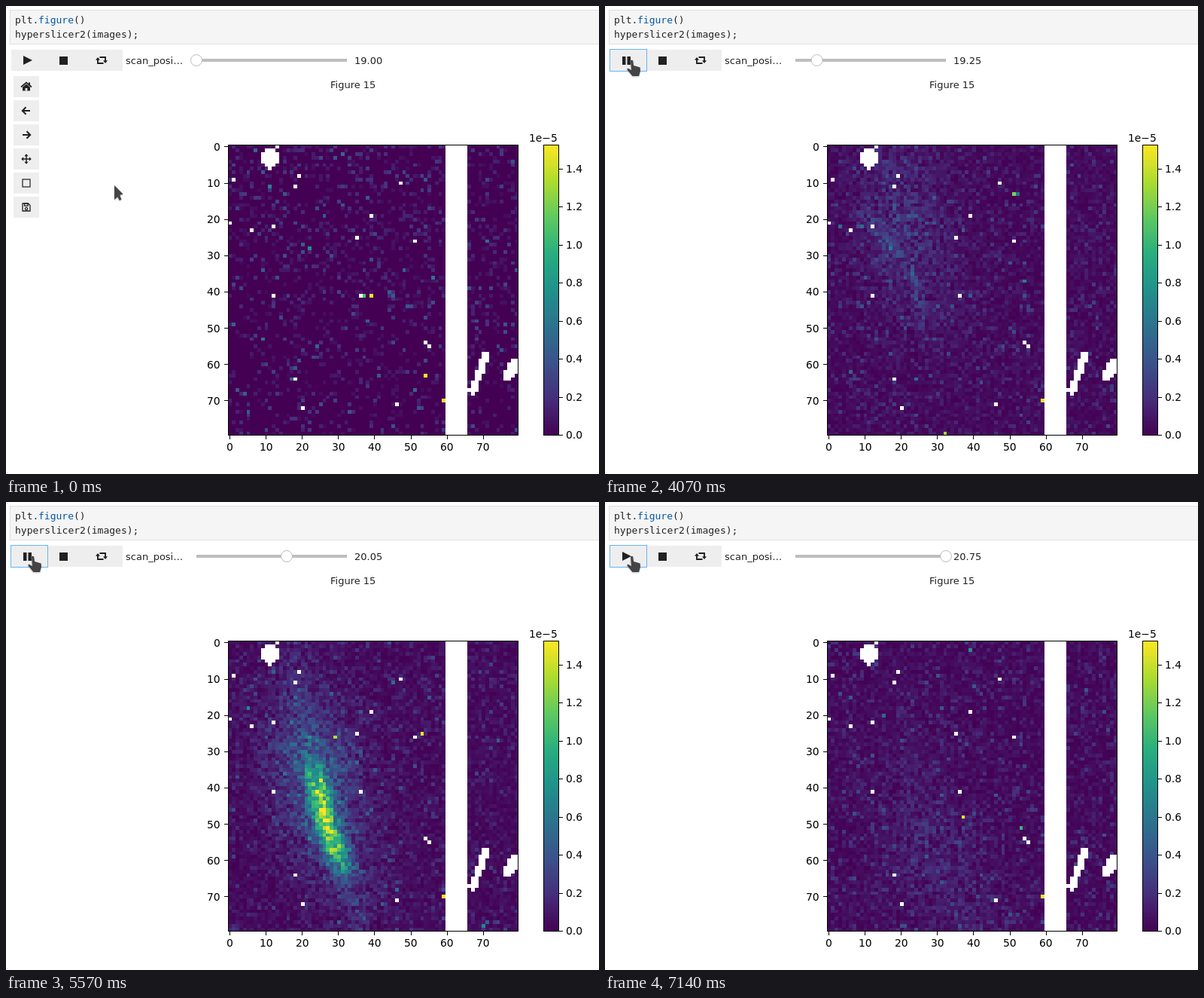
An HTML page with a canvas that plays this animation: 788 by 621 pixels, repeating every 8000 ms.

```html
<!DOCTYPE html>
<html lang="en">
<head>
<meta charset="utf-8">
<title>Image slicer</title>
<style>
html, body { margin: 0; width: 100%; height: 100%; overflow: hidden; background: #fff; }
canvas { display: block; }
</style>
</head>
<body>
<canvas id="stage" width="788" height="621"></canvas>
<script>
const ctx = document.getElementById('stage').getContext('2d');
const LOOP = 8000, STEP = 71.4, SLICE = 96, LAST = 35;
const HOVER = 1710, ENTER = 2070, PRESS = 3360, PLAY = 3570, END = 7140;
const N = 80, VMAX = 1.527;
const AX = { x: 295.5, y: 184.5, size: 385 };
const INK = '#212121', GREY = '#bdbdbd', PALE = '#eee';
const SANS = '"DejaVu Sans", sans-serif';
const MONO = '"DejaVu Sans Mono", monospace';

const clamp = (v, lo, hi) => Math.min(hi, Math.max(lo, v));
const mix = (a, b, p) => a + (b - a) * p;
const bell = v => Math.exp(-v * v);

// Colour map
const STOPS = ['440154', '472d7b', '3b528b', '2c728e', '21918c', '28ae80', '5ec962', 'addc30', 'fde725']
  .map(h => [0, 2, 4].map(i => parseInt(h.slice(i, i + 2), 16)));

function viridis(p) {
  const q = clamp(p, 0, 1) * (STOPS.length - 1);
  const i = Math.min(Math.floor(q), STOPS.length - 2);
  return STOPS[i].map((c, k) => Math.round(mix(c, STOPS[i + 1][k], q - i)));
}

function random(seed) {
  let a = seed * 7919 + 17;
  return () => {
    a = (a + 0x6D2B79F5) | 0;
    let t = Math.imul(a ^ (a >>> 15), 1 | a);
    t = (t + Math.imul(t ^ (t >>> 7), 61 | t)) ^ t;
    return ((t ^ (t >>> 14)) >>> 0) / 4294967296;
  };
}

// Distance from a point to a segment
function distance(x, y, x1, y1, x2, y2) {
  const dx = x2 - x1, dy = y2 - y1;
  const p = clamp(((x - x1) * dx + (y - y1) * dy) / (dx * dx + dy * dy), 0, 1);
  return Math.hypot(x - x1 - p * dx, y - y1 - p * dy);
}

// Brightness of the plume: it swells until slice 15, then thins and sinks
function plume(x, y, s) {
  const d = x - (18.5 + .05 * y + .0023 * y * y);
  const burst = bell((s - 15) / 5.5);
  const width = clamp((s - 3) / 3.3, 1, 3.3);
  const reach = (y - 40 - .42 * s) / (10 + 14 * burst);
  const body = 3 * burst * bell(d / width) * bell(reach * reach);
  const thread = .7 * burst * burst * bell(d / 2.8);
  const core = 1.3 * burst ** 2 * bell(Math.hypot(x - 24, y - 31) / 8);
  const jet = bell((s - 9) / 3) * bell(distance(x, y, 10, 17, 18, 29) / 1.6);
  const haze = .45 * clamp(s / 8, 0, 1) * Math.exp(-Math.abs(s - 15) / 12)
    * bell(d / 12) * bell((y - 15 - 1.25 * s) / 26);
  return body + thread + core + jet + haze;
}

// Cells without data: a gap, three blots and scattered dots
function blank(x, y) {
  return (x >= 60 && x < 66)
    || Math.hypot((x - 11) / 2.3, (y - 3.2) / 2.9) < 1
    || distance(x, y, 70.7, 57.5, 66.9, 67.2) < 1.05
    || distance(x, y, 78.6, 60.3, 76.5, 62.8) < 1.5;
}

function scatter(rnd, count, draw) {
  for (let i = 0; i < count; i++) draw(Math.floor(rnd() * 58), Math.floor(rnd() * N));
}

const map = document.createElement('canvas');
map.width = map.height = N;
const mapCtx = map.getContext('2d');
const pixels = mapCtx.createImageData(N, N);
const WHITE = [255, 255, 255];
let shown = -1;

function setCell(x, y, rgb) {
  pixels.data.set([...rgb, 255], (y * N + x) * 4);
}

function renderMap(slice) {
  if (slice === shown) return;
  shown = slice;
  const rnd = random(slice + 3);
  const dense = Math.min(1, slice / 5);
  for (let y = 0; y < N; y++) {
    for (let x = 0; x < N; x++) {
      const spread = -Math.log(1 - rnd());
      const sparse = rnd() < .28 - .0015 * y ? .04 + .09 * spread : 0;
      const glow = dense * plume(x, y, slice);
      const v = mix(sparse, .06 * spread, dense) + glow + (rnd() - .5) * .7 * Math.sqrt(glow);
      setCell(x, y, blank(x, y) ? WHITE : viridis(v / VMAX));
    }
  }
  scatter(rnd, 3, (x, y) => setCell(x, y, viridis(.4 + .6 * rnd())));
  setCell(59, 70, viridis(.97));
  scatter(random(5), 18, (x, y) => setCell(x, y, WHITE));
  mapCtx.putImageData(pixels, 0, 0);
}

// Drawing helpers; text starts on a whole pixel
function text(s, x, y, { size = 13, color = INK, align = 0, family = SANS } = {}) {
  ctx.font = `${size}px ${family}`;
  ctx.fillStyle = color;
  ctx.fillText(s, Math.round(x - align * ctx.measureText(s).width), Math.round(y));
}

function rect(x, y, w, h, color) {
  ctx.fillStyle = color;
  ctx.fillRect(x, y, w, h);
}

function frame(x, y, w, h, color, width = 1) {
  ctx.strokeStyle = color;
  ctx.lineWidth = width;
  ctx.strokeRect(x, y, w, h);
}

function poly(points, color) {
  ctx.beginPath();
  points.forEach(([x, y]) => ctx.lineTo(x, y));
  ctx.closePath();
  ctx.fillStyle = color;
  ctx.fill();
}

function line(points, width) {
  ctx.beginPath();
  points.forEach(([x, y]) => ctx.lineTo(x, y));
  ctx.lineWidth = width;
  ctx.strokeStyle = INK;
  ctx.stroke();
}

function circle(x, y, r, width, color, fill) {
  ctx.beginPath();
  ctx.arc(x, y, r, 0, 7);
  if (fill) {
    ctx.fillStyle = fill;
    ctx.fill();
  }
  ctx.lineWidth = width;
  ctx.strokeStyle = color;
  ctx.stroke();
}

function at(x, y, angle, draw) {
  ctx.save();
  ctx.translate(x, y);
  ctx.rotate(angle);
  draw();
  ctx.restore();
}

function shadow(blur) {
  ctx.shadowColor = 'rgba(0,0,0,.3)';
  ctx.shadowBlur = blur;
  ctx.shadowOffsetY = 1;
}

function drawCode() {
  rect(5, 5, 800, 46, '#e0e0e0');
  rect(6, 6, 800, 44, '#f5f5f5');
  text('plt.', 12, 23, { family: MONO });
  text('figure', 43.3, 23, { family: MONO, color: '#0055aa' });
  text('()', 90.3, 23, { family: MONO });
  text('hyperslicer2(images);', 12, 42, { family: MONO });
}

function button(x, w, fill, hover) {
  ctx.save();
  if (hover) shadow(4);
  rect(x, 58, w, 28, fill);
  ctx.restore();
}

function repeatArm() {
  line([[-5, -1], [-5, 4], [2.5, 4]], 1.9);
  poly([[-8, -.3], [-5, -4], [-2, -.3]], INK);
}

function drawPlayer(t) {
  const pressed = t >= PRESS;
  const shade = pressed ? Math.round(mix(189, 238, clamp((t - PLAY) / 360, 0, 1))) : 238;
  button(101, 54, PALE);
  button(55, 46, PALE, t >= HOVER && t < ENTER);
  button(7, 48, `rgb(${shade},${shade},${shade})`, t >= ENTER && !pressed);
  if (pressed) frame(6.5, 57.5, 49, 29, '#64b5f6');
  if (t >= PLAY && t < END) {
    rect(23, 67, 4.5, 11, INK);
    rect(29.5, 67, 4.5, 11, INK);
  } else {
    poly([[23, 66], [35, 72], [23, 78]], INK);
  }
  rect(71, 67, 11, 11, INK);
  at(127, 72, 0, repeatArm);
  at(127, 72, Math.PI, repeatArm);
}

function drawSlider(handle, value) {
  text('scan_posi…', 159, 77);
  rect(253, 70, 200, 4, GREY);
  circle(253 + 200 * handle / LAST, 72, 7.5, 1, GREY, '#fff');
  text((19 + value * .05).toFixed(2), 463, 77);
}

function home() {
  line([[-7, .5], [0, -5.5], [7, .5]], 1.7);
  rect(3, -5.5, 2, 4, INK);
  poly([[-5, .8], [0, -3.4], [5, .8], [5, 5.5], [-5, 5.5]], INK);
  rect(-1.4, 2, 2.8, 3.5, PALE);
}

function arrow() {
  line([[-5, 0], [5, 0]], 2);
  line([[.5, -4.7], [5.2, 0], [.5, 4.7]], 2);
}

function move() {
  for (let i = 0; i < 4; i++) at(0, 0, i * Math.PI / 2, () => {
    line([[0, 0], [5, 0]], 1.5);
    poly([[3.8, -2.7], [6.8, 0], [3.8, 2.7]], INK);
  });
}

function save() {
  line([[-5, -5], [2.5, -5], [5, -2.5], [5, 5], [-5, 5], [-5, -5.5]], 1.3);
  frame(-2.5, -5, 4.5, 3.2, INK, 1.3);
  circle(0, 2, 1.6, 1.3, INK);
}

const ICONS = [home, () => at(0, 0, Math.PI, arrow), arrow, move, () => frame(-5, -5, 10, 10, INK, 1.2), save];

function drawToolbar(t) {
  const alpha = t < HOVER ? 1 : t < ENTER ? .7 : t < 2210 ? .2 : 0;
  if (!alpha) return;
  ctx.globalAlpha = alpha;
  ICONS.forEach((icon, i) => {
    rect(10, 93 + 32 * i, 34, 28, PALE);
    at(27, 107 + 32 * i, 0, icon);
  });
  ctx.globalAlpha = 1;
}

function drawPlot(slice) {
  renderMap(slice);
  const { x, y, size: side } = AX;
  const label = (s, lx, ly, align = 0) => text(s, lx, ly, { size: 13.89, color: '#000', align });
  text('Figure 15', 461, 109, { align: .5 });
  ctx.imageSmoothingEnabled = false;
  ctx.drawImage(map, x, y, side, side);
  for (let i = 0; i < side; i++) rect(714.5, y + i, 20, 1.5, `rgb(${viridis(1 - i / side)})`);
  frame(x, y, side, side, '#000');
  frame(714.5, y, 20, side, '#000');
  for (let n = 0; n < N; n += 10) {
    const d = (n + .5) * side / N;
    rect(Math.floor(x + d - .5), 570, 1, 5, '#000');
    rect(290, Math.floor(y + d), 5, 1, '#000');
    label(n, x + d - .6, 590, .5);
    label(n, 285, y + d + 5, 1);
  }
  for (let v = 0; v < 1.5; v += .2) {
    const py = y + side * (1 - v / VMAX);
    rect(735, Math.floor(py), 5, 1, '#000');
    label(v.toFixed(1), 744, Math.floor(py) + 5);
  }
  label('1e−5', 733, 180, 1);
}

const POINTER = [[0, 0], [0, 19], [4.2, 15.2], [6.8, 20], [9.4, 18.7], [7.2, 13], [11.5, 11.5]];
const HAND = [[4.5, 0], [7.5, 0], [8.5, 7], [17, 9.5], [17.5, 14], [15.5, 21], [7, 21], [0, 12.5], [.5, 10.5], [5.5, 13]];

function cursor(shape, x, y) {
  at(x, y, 0, () => {
    ctx.save();
    shadow(2);
    poly(shape, '#444');
    ctx.restore();
    ctx.lineJoin = 'round';
    ctx.lineWidth = 1;
    ctx.strokeStyle = 'rgba(255,255,255,.6)';
    ctx.stroke();
    poly(shape, '#444');
  });
}

function drawCursor(t) {
  if (t >= ENTER) return cursor(HAND, 29.5, 72);
  if (t >= HOVER) return cursor(HAND, 58, 76);
  const p = clamp(Math.floor((t - 860) / STEP) + 1, 0, 12) / 12;
  const e = p * p * (3 - 2 * p);
  cursor(POINTER, mix(144, 59, e), mix(238, 88, e));
}

// Slices passed since the given moment
function passed(t, since) {
  return t < PLAY ? 0 : clamp(Math.floor((t - since) / SLICE), 0, LAST);
}

function draw(t) {
  const value = passed(t, 3540);
  rect(0, 0, 788, 621, '#fff');
  drawCode();
  drawPlayer(t);
  drawSlider(passed(t, 3500), value);
  drawToolbar(t);
  drawPlot(value);
  drawCursor(t);
}

const start = performance.now();
function tick() {
  draw((performance.now() - start) % LOOP);
  requestAnimationFrame(tick);
}
tick();
</script>
</body>
</html>
```
